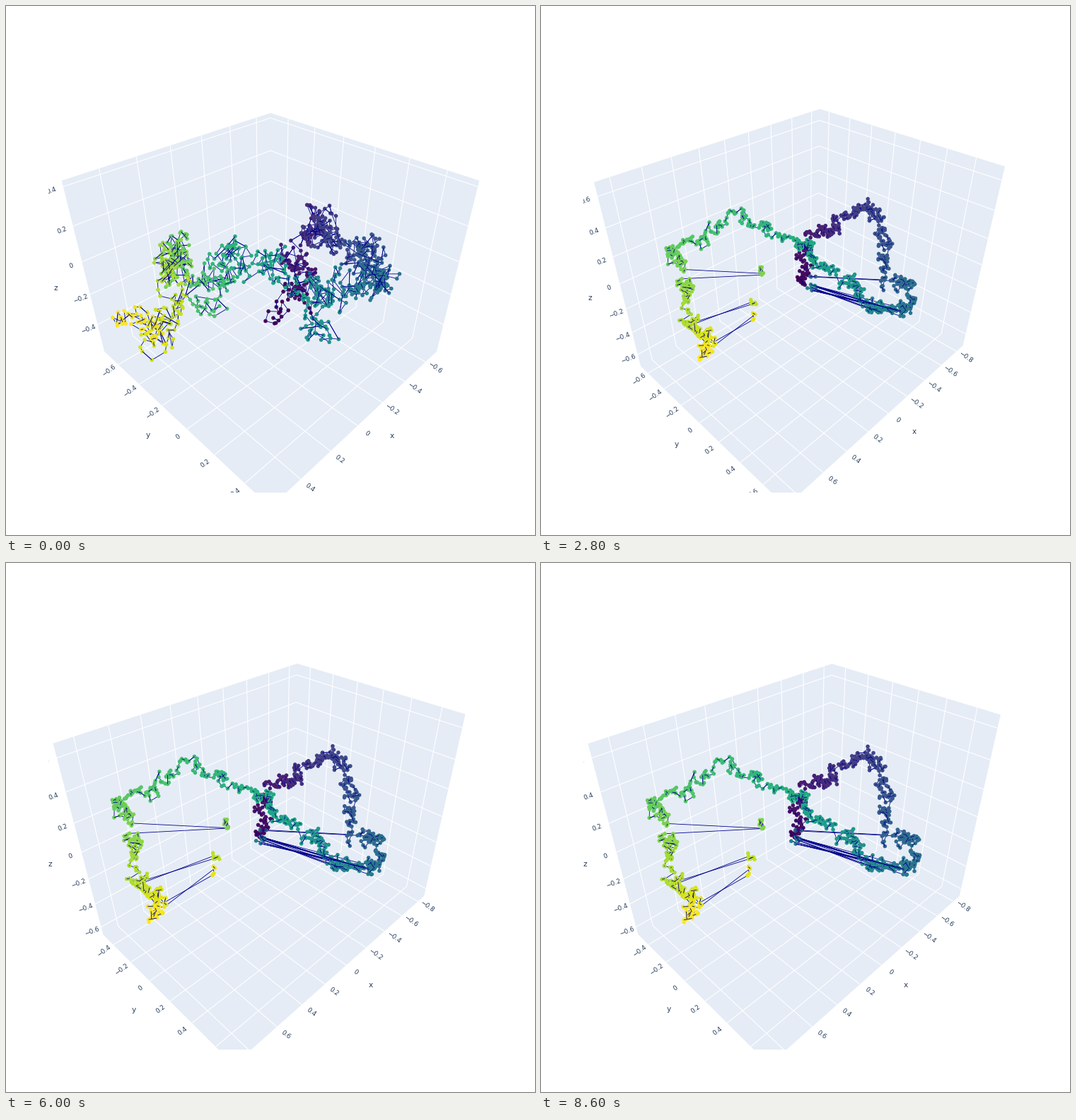
A matplotlib script that plays this animation: 748x748 px, repeating every 8800 ms.

```python
import numpy as np
import matplotlib.pyplot as plt
from matplotlib.animation import FuncAnimation
from matplotlib.collections import LineCollection

SIZE, DPI = 748, 100
LEFT, TOP, EDGE = 59.84, 74.8, 688.16      # scene viewport in pixels
CENTER = np.array([374, 381.5])
FOCAL = 740.5
EYE = 1.25 * np.sqrt(3)
RIGHT = np.array([-1, 1, 0]) / np.sqrt(2)
UP = np.array([-1, -1, 2]) / np.sqrt(6)
TOWARD = np.ones(3) / np.sqrt(3)
FRAMES, INTERVAL = 44, 200
COUNT = 1000
OPENED, SETTLED, REST = 6, 23, 30          # frames: unrolled, fully grown, reference pose
INK, PANEL, CHAIN = "#2a3f5f", "#e5ecf6", "#00008b"

# Low and high limits of x, y, z while the box widens, then its slow sway
BOX_FRAMES = [0, OPENED, 14, SETTLED]
BOX_LIMITS = np.array([
    [-.714, .583, -.742, .555, -.595, .429],
    [-.804, .782, -.603, .710, -.683, .640],
    [-.886, .891, -.695, .784, -.712, .686],
    [-.893, .907, -.570, .753, -.640, .675],
])
BOX_SWAY = np.array([-.015, -.003, -.048, .010, .029, -.005])

# Screen waypoints, evenly spaced along the chain
COIL = [(378, 432), (418, 400), (412, 362), (425, 310), (440, 302), (455, 318), (485, 345),
        (512, 335), (510, 375), (540, 372), (520, 410), (490, 380), (450, 392), (440, 455),
        (410, 375), (365, 372), (310, 330), (305, 385), (285, 430), (235, 345), (235, 375),
        (225, 350), (235, 400), (235, 445), (218, 450), (165, 440)]
LOOP = [(368, 388), (362, 362), (375, 308), (405, 302), (428, 284), (460, 272), (482, 300),
        (490, 345), (492, 385), (533, 395), (518, 435), (490, 432), (455, 425), (436, 385),
        (388, 366), (372, 330), (325, 315), (262, 280), (212, 318), (150, 340), (175, 370),
        (180, 400), (180, 448), (205, 460), (225, 485), (208, 500)]

# Links that jump away from the chain, and where they land
STRAYS = [(range(803, 811), (309, 368)), (range(898, 906), (298, 416)),
          (range(962, 966), (295, 436)), (range(316, 319), (360, 379)),
          (range(400, 450, 9), (360, 390))]


def box_at(k):
    """Limits, scale and midpoint of the box at frame k."""
    limits = np.array([np.interp(k, BOX_FRAMES, column) for column in BOX_LIMITS.T])
    fade = np.interp(k, [BOX_FRAMES[-2], SETTLED], [0, 1])
    limits = limits + BOX_SWAY * fade * np.cos(2 * np.pi * (k - SETTLED) / 14)
    low, high = limits[::2], limits[1::2]
    return low, high, np.prod(high - low) ** (-1 / 3), (low + high) / 2


def project(points):
    points = np.asarray(points, float)
    depth = EYE - points @ TOWARD
    px = CENTER[0] + FOCAL * points @ RIGHT / depth
    py = CENTER[1] - FOCAL * points @ UP / depth
    return np.column_stack([px, py, depth])


def to_data(pixels, k):
    """Lift screen points of frame k onto the plane facing the viewer."""
    _, _, scale, middle = box_at(k)
    flat = (np.asarray(pixels, float) - CENTER) * EYE / FOCAL
    return (np.outer(flat[:, 0], RIGHT) - np.outer(flat[:, 1], UP)) / scale + middle


def wobble(spread, memory):
    """Correlated noise around the chain."""
    out = rng.normal(0, spread * np.sqrt(1 - memory ** 2), (COUNT, 2))
    for i in range(1, COUNT):
        out[i] += memory * out[i - 1]
    return out


def along(waypoints):
    where = np.linspace(0, len(waypoints) - 1, COUNT)
    return np.column_stack([np.interp(where, range(len(waypoints)), axis)
                            for axis in zip(*waypoints)])


def chain_at(k):
    unroll = min(k / OPENED, 1) ** 0.6
    growth = np.interp(k, [OPENED, SETTLED], [0.92, 1])
    drift = np.interp(k, [0, OPENED, SETTLED], [0, 0.8, 1])
    loop = loop_data + drift * stray_jump
    return coil_data * (1 - unroll) + loop * growth * unroll


def ticks(low, high):
    step = 0.5 if high - low > 1.8 else 0.2
    return np.arange(np.ceil(low / step), np.floor(high / step) + 1) * step


def write(x, y, text, px, angle=0):
    ax.text(x, y, text, fontsize=px * 72 / DPI, color=INK, rotation=angle, ha="center",
            va="center", rotation_mode="anchor", clip_on=True, zorder=6)


def draw_box(low, high, scale, middle):
    a, b, c = (high - low) * scale / 2
    hull = [(a, -b, c), (-a, -b, c), (-a, b, c), (-a, b, -c), (a, b, -c), (a, -b, -c)]
    ax.fill(*project(hull)[:, :2].T, color=PANEL, lw=0, zorder=0)

    grid_path = [lambda s: [(s, -b, c), (s, -b, -c), (s, b, -c)],
                 lambda s: [(-a, s, c), (-a, s, -c), (a, s, -c)],
                 lambda s: [(a, -b, s), (-a, -b, s), (-a, b, s)]]
    label_edge = [lambda s: (s, b, -c), lambda s: (a, s, -c), lambda s: (a, -b, s)]
    label_shift = [lambda near: (13, 10 + 8 * near),
                   lambda near: (-13, 10 + 8 * near),
                   lambda near: (-14.5 - 10 * near, 6)]
    title_shift = [lambda near: (37, 26),
                   lambda near: (-38, 25),
                   lambda near: (-42 - 20 * near, 18)]
    angles = [-36, 36, 20]

    lines = []
    for axis in range(3):
        for value in ticks(low[axis], high[axis]):
            s = (value - middle[axis]) * scale
            lines.append(project(grid_path[axis](s))[:, :2])
            x, y, depth = project([label_edge[axis](s)])[0]
            dx, dy = label_shift[axis](EYE - depth)
            text = f"{round(value, 1) + 0:g}".replace("-", "\u2212")
            write(x + dx, y + dy, text, 9, angles[axis])
        x, y, depth = project([label_edge[axis](0)])[0]
        dx, dy = title_shift[axis](EYE - depth)
        write(x + dx, y + dy, "xyz"[axis], 10.5)
    ax.add_collection(LineCollection(lines, colors="white", linewidths=0.8, zorder=1))


def draw_chain(points):
    links = np.stack([points[:-1], points[1:]], axis=1)
    style = dict(colors=CHAIN, linewidths=0.6)
    ax.add_collection(LineCollection(links, zorder=2, **style))
    ax.scatter(*points.T, c=np.arange(COUNT), cmap="viridis", s=16, lw=0, zorder=3)
    ax.add_collection(LineCollection(links[::4], zorder=4, **style))


def draw(k):
    ax.clear()
    ax.axis("off")
    ax.set_xlim(LEFT, EDGE)
    ax.set_ylim(EDGE, TOP)
    ax.set_autoscale_on(False)
    low, high, scale, middle = box_at(k)
    draw_box(low, high, scale, middle)
    draw_chain(project((chain_at(k) - middle) * scale)[:, :2])
    return []


rng = np.random.default_rng(12)
coil_data = to_data(along(COIL) + wobble(14, 0.78), 0)
loop_pixels = along(LOOP) + wobble(6, 0.75)
stray_pixels = loop_pixels.copy()
for members, spot in STRAYS:
    stray_pixels[members] = spot + rng.normal(0, 4, (len(members), 2))
loop_data = to_data(loop_pixels, REST)
stray_jump = to_data(stray_pixels, REST) - loop_data

plt.rcParams["font.family"] = "DejaVu Sans"
fig = plt.figure(figsize=(SIZE / DPI, SIZE / DPI), dpi=DPI, facecolor="white")
ax = fig.add_axes([LEFT / SIZE, 1 - EDGE / SIZE, (EDGE - LEFT) / SIZE, (EDGE - TOP) / SIZE])
anim = FuncAnimation(fig, draw, frames=FRAMES, interval=INTERVAL, repeat=True, repeat_delay=0)
plt.show()
```
